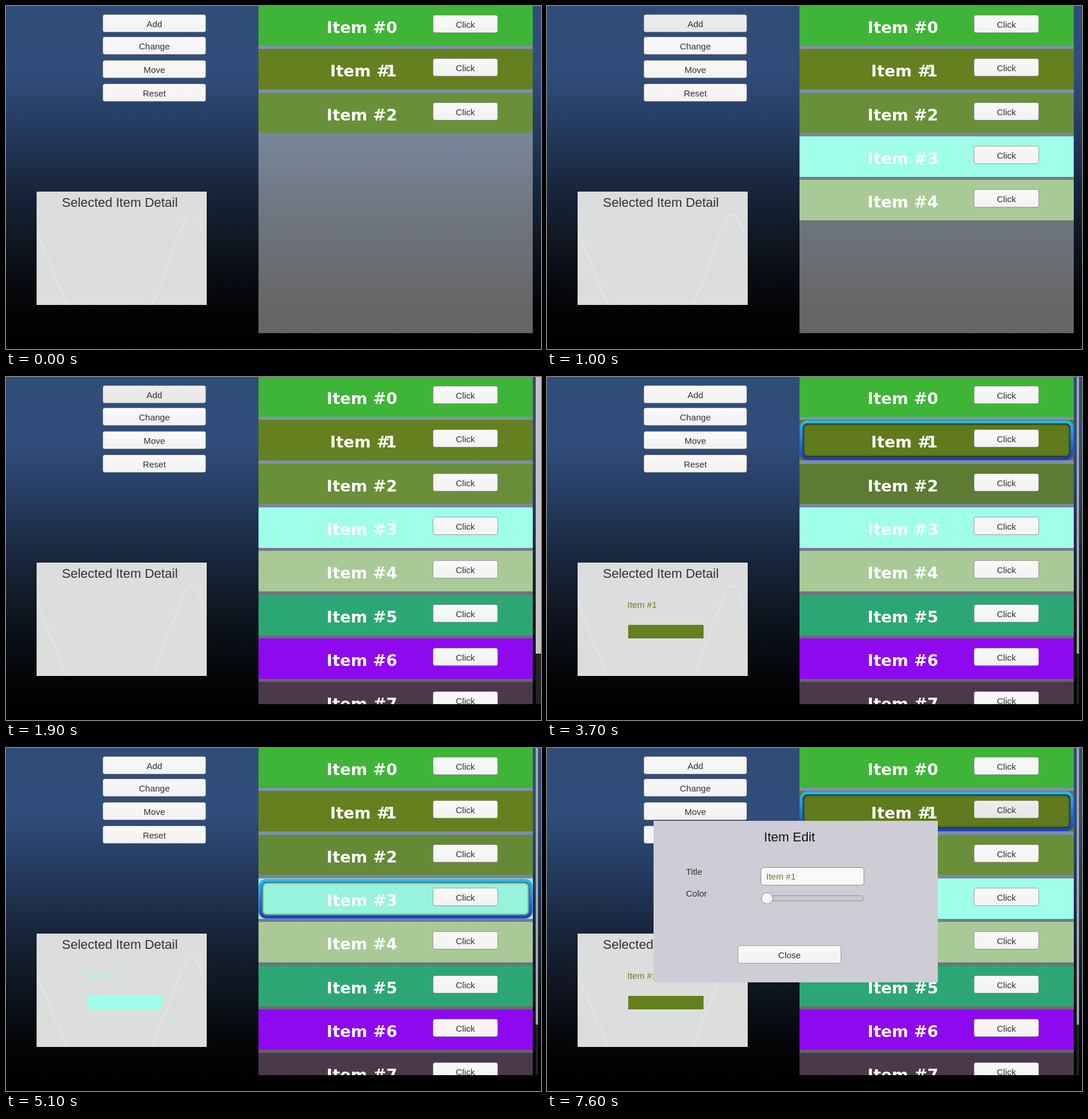
An HTML page that plays this animation: 909x584 px, repeating every 8 s.

```html
<!DOCTYPE html>
<html lang="en">
<head>
<meta charset="utf-8">
<title>Item list</title>
<style>
html, body { margin: 0; width: 100%; height: 100%; overflow: hidden; background: #000; }
svg { display: block; width: 100%; height: 100%; }
text { font: 15px "Liberation Sans", Arial, sans-serif; fill: #323232; }
.mid { text-anchor: middle; }
.big { font-size: 22px; }
.name { font: bold 27px "DejaVu Sans", Verdana, sans-serif; fill: #fff; }
.btn rect { fill: url(#face); stroke: #555; stroke-opacity: .5; }

/* every change is a hard cut: 1% = 80 ms */
.row3, .row4, .row5, .row6, .row7, .bar, .popup, .sel1, .sel2, .sel3,
.handle, .add rect, .click1 rect, .fill1, .fill2, .fill3 {
  animation: 8s step-end infinite;
}
.row3 { animation-name: row3; }
.row4 { animation-name: row4; }
.row5 { animation-name: row5; }
.row6 { animation-name: row6; }
.row7 { animation-name: row7; }
.popup { animation-name: popup; }
.sel1 { animation-name: sel1; }
.sel2 { animation-name: sel2; }
.sel3 { animation-name: sel3; }
.fill1 { animation-name: fill1; }
.fill2 { animation-name: fill2; }
.fill3 { animation-name: fill3; }
.add rect { animation-name: add; }
.click1 rect { animation-name: click; }
.bar { animation-name: row7, thin; transform-origin: 900px 0; }
.handle { animation-name: handle; }

@keyframes row3 { 0% { visibility: hidden } 7.5%, 100% { visibility: visible } }
@keyframes row4 { 0% { visibility: hidden } 12.5%, 100% { visibility: visible } }
@keyframes row5 { 0% { visibility: hidden } 15%, 100% { visibility: visible } }
@keyframes row6 { 0% { visibility: hidden } 16.25%, 100% { visibility: visible } }
@keyframes row7 { 0% { visibility: hidden } 18.75%, 100% { visibility: visible } }
@keyframes popup { 0% { visibility: hidden } 95%, 100% { visibility: visible } }
@keyframes sel1 {
  0%, 47.5% { visibility: hidden }
  40%, 75%, 100% { visibility: visible }
}
@keyframes sel2 { 0%, 56.25%, 100% { visibility: hidden } 47.5% { visibility: visible } }
@keyframes sel3 { 0%, 75%, 100% { visibility: hidden } 56.25% { visibility: visible } }
@keyframes fill1 {
  0%, 47.5% { filter: brightness(1) }
  38.75%, 73.75% { filter: brightness(.87) }
  40%, 75%, 100% { filter: brightness(.955) }
}
@keyframes fill2 {
  0%, 73.75%, 100% { filter: brightness(1) }
  42.5%, 47.5% { filter: brightness(.965) }
  46.25% { filter: brightness(.87) }
}
@keyframes fill3 {
  0%, 75%, 100% { filter: brightness(1) }
  55% { filter: brightness(.87) }
  56.25% { filter: brightness(.953) }
}
@keyframes add {
  0%, 38.75%, 100% { filter: brightness(1) }
  6.25%, 11.25%, 13.75%, 17.5%, 21.25% { filter: brightness(.88) }
  7.5%, 12.5%, 15%, 18.75%, 22.5% { filter: brightness(.95) }
}
@keyframes click {
  0% { filter: brightness(1) }
  82.5%, 95%, 100% { filter: brightness(.95) }
  93.75% { filter: brightness(.87) }
}
@keyframes thin { 0% { transform: none } 33.75%, 100% { transform: scaleX(.45) } }
@keyframes handle {
  0% { height: 527px; fill: #c3c1c4 }
  22.5% { height: 471px; fill: #c3c1c4 }
  33.75%, 100% { height: 471px; fill: #a5a5a8 }
}
</style>
</head>
<body>
<svg id="stage" viewBox="0 0 909 584" preserveAspectRatio="none">
  <defs>
    <linearGradient id="sky" x2="0" y2="1">
      <stop offset="0" stop-color="#304c79"/>
      <stop offset=".19" stop-color="#304d7b"/>
      <stop offset=".35" stop-color="#253c61"/>
      <stop offset=".52" stop-color="#18273e"/>
      <stop offset=".7" stop-color="#0e151f"/>
      <stop offset=".88" stop-color="#030406"/>
      <stop offset="1" stop-color="#000"/>
    </linearGradient>
    <linearGradient id="face" x2="0" y2="1">
      <stop offset="0" stop-color="#f9f9f9"/>
      <stop offset="1" stop-color="#f2f2f2"/>
    </linearGradient>
    <linearGradient id="glow" x2="0" y2="1">
      <stop offset="0" stop-color="#25b6ff"/>
      <stop offset="1" stop-color="#1a3fcb"/>
    </linearGradient>
    <clipPath id="view"><path d="M429 0H895V557H429z"/></clipPath>
  </defs>
</svg>
<script>
const colors = ['#3eb537', '#65801f', '#698f38', '#9fffe8',
                '#a9ca97', '#2da675', '#8f09f0', '#4b394b'];

const rect = (x, y, w, h, attrs = '') =>
  `<rect x="${x}" y="${y}" width="${w}" height="${h}" ${attrs}/>`;

const text = (x, y, label, attrs = '') => `<text x="${x}" y="${y}" ${attrs}>${label}</text>`;

const button = (x, y, w, label, cls = '') =>
  `<g class="btn ${cls}">${rect(x + .5, y + .5, w - 1, 30, 'rx="3.5"')}` +
  text(x + w / 2, y + 22, label, 'class="mid"') + '</g>';

const ring = (y, inset, width, radius, stroke, opacity = 1) =>
  rect(429 + inset, y + inset, 466 - 2 * inset, 68.5 - 2 * inset,
    `rx="${radius}" fill="none" stroke="${stroke}" stroke-width="${width}" opacity="${opacity}"`);

const frame = (y, i) => `<g class="sel${i}">` +
  ring(y, 7, 5, 7, '#000', .14) +
  ring(y, 6, 2.5, 8, '#000', .45) +
  ring(y, 3, 5, 10, 'url(#glow)') + '</g>';

function row(color, i) {
  const y = Math.round(74.3 * i - 1);
  // the digit 1 is narrow, so its label sits tighter
  const label = i === 1 ? 'Item #<tspan dx="-7">1</tspan>' : 'Item #' + i;
  return `<g class="row${i}">` +
    rect(429, y, 466, i === 2 ? 68 : 69, `class="fill${i}" fill="${color}"`) +
    (i > 0 && i < 4 ? frame(y + .5, i) : '') +
    text(i === 1 ? 550.6 : 544.6, y + 46.5, label, 'class="name"') +
    button(725, y + 16, 111, 'Click', 'click' + i) + '</g>';
}

const detail = i => `<g class="sel${i}">` +
  text(136.5, 393, 'Item #' + i, `style="fill:${colors[i]}"`) +
  rect(138, 422, 128, 23, `fill="${colors[i]}"`) + '</g>';

const menu = button(164, 14, 176, 'Add', 'add') + button(164, 52, 176, 'Change') +
  button(164, 92, 176, 'Move') + button(164, 132, 176, 'Reset');

const info = rect(52, 316, 289, 193, 'fill="#dcdddd"') +
  `<path d="M53 386L103 508M249 508L303 367Q315 343 326 367L335 388"
    fill="none" stroke="#e4e8e8" stroke-width="2"/>` +
  text(95, 342, 'Selected Item Detail', 'class="big"') +
  [1, 2, 3].map(detail).join('');

const list = rect(429, 0, 466, 557, 'fill="#fff" opacity=".392"') +
  `<g clip-path="url(#view)">${colors.map(row).join('')}</g>`;

const bar = '<g class="bar">' + rect(900, 0, 9, 557, 'fill="#212121"') +
  rect(900, 0, 9, 527, 'class="handle"') + '</g>';

const popup = '<g class="popup">' + rect(181, 124, 483, 275, 'fill="#cecdd6"') +
  text(412, 159, 'Item Edit', 'class="mid big" style="fill:#141414"') +
  text(236, 215.5, 'Title') + text(236, 253, 'Color') +
  rect(363.5, 203.5, 175, 30, 'rx="4" fill="#f8f8f8" stroke="#8e8e92"') +
  text(372.5, 224, 'Item #1', `style="fill:${colors[1]}"`) +
  rect(364.5, 251.5, 174, 9, 'rx="4.5" fill="#c9c9cc" stroke="#8e8e92"') +
  '<circle cx="374" cy="256" r="9.5" fill="#f7f7f7" stroke="#8e8e92"/>' +
  button(324, 336, 176, 'Close') + '</g>';

document.getElementById('stage').innerHTML +=
  rect(0, 0, 909, 584, 'fill="url(#sky)"') + menu + info + list + bar + popup;
</script>
</body>
</html>
```
